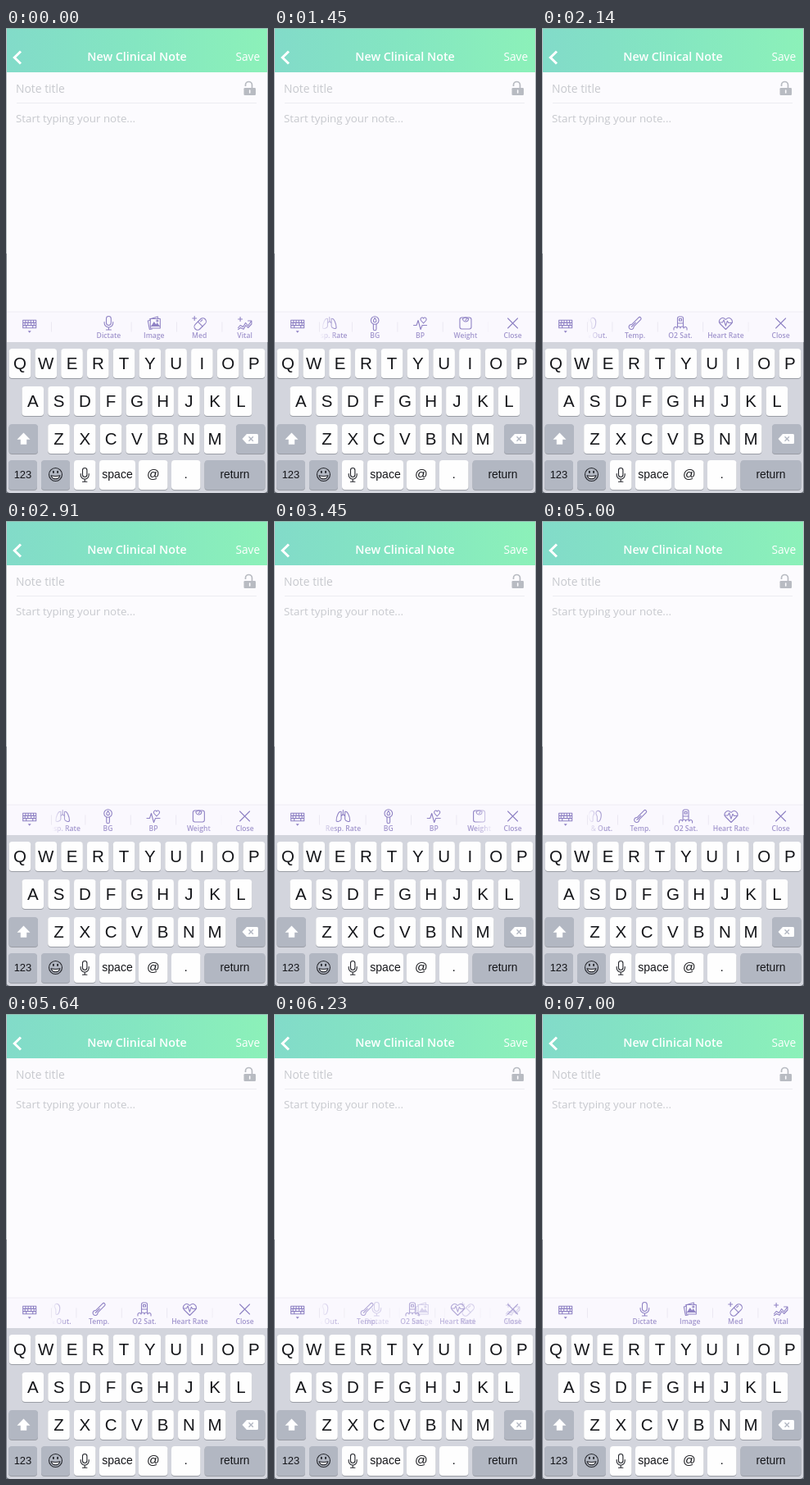
These frames come from a looping animation (320 px wide and 567 px high, 7.05 s). An HTML page:

```html
<!DOCTYPE html>
<html lang="en">
<head>
<meta charset="utf-8">
<title>Clinical note</title>
<style>
html, body { margin: 0; width: 100%; height: 100%; overflow: hidden; background: #fcfbfe; }
svg { display: block; width: 320px; height: 567px; }
text { font-family: "Open Sans", "Noto Sans", sans-serif; }
.hint { fill: #c7c9ce; }
.keys text { font-family: "Liberation Sans", Arial, sans-serif; fill: #15161a; text-anchor: middle; }
.icon { fill: none; stroke: #8f82c4; stroke-width: 1.1; stroke-linecap: round; stroke-linejoin: round; }
.icon .solid { fill: #8f82c4; stroke: none; }
.label { font-size: 8.6px; font-weight: 600; fill: #a195cd; text-anchor: middle; }
.sep { stroke: #ebe8f2; stroke-width: 1; }
#main, #vitals, #strip { animation: 7050ms linear infinite; }
#main { animation-name: main; }
#vitals { animation-name: vitals; }
#strip { animation-name: scroll; }
@keyframes main {
  0%, 12.06%, 90.8%, 100% { opacity: 1; }
  15.6%, 87.2% { opacity: 0; }
}
@keyframes vitals {
  0%, 12.06%, 90.8%, 100% { opacity: 0; }
  15.6%, 87.2% { opacity: 1; }
}
@keyframes scroll {
  0%, 19.9% { transform: translateX(0); animation-timing-function: cubic-bezier(.3, .2, .3, 1); }
  29.1%, 33.3% { transform: translateX(-247.8px); animation-timing-function: cubic-bezier(.3, .2, .3, 1); }
  44.7% { transform: translateX(0); }
  60.6% { transform: translateX(0); animation-timing-function: cubic-bezier(.5, 0, .8, .6); }
  62.1% { transform: translateX(-14.8px); animation-timing-function: cubic-bezier(.25, .4, .5, .95); }
  70.92% { transform: translateX(-241.2px); animation-timing-function: ease-out; }
  76.6%, 100% { transform: translateX(-247.8px); }
}
</style>
</head>
<body>
<svg viewBox="0 0 320 567">
  <defs>
    <linearGradient id="mint">
      <stop offset="0" stop-color="#82dbc9"/>
      <stop offset=".5" stop-color="#84e6c1"/>
      <stop offset="1" stop-color="#8cf1b9"/>
    </linearGradient>
    <linearGradient id="fade" gradientUnits="userSpaceOnUse" x1="56" x2="268" y1="0" y2="0">
      <stop offset="0" stop-color="#000"/>
      <stop offset=".1" stop-color="#fff"/>
      <stop offset=".89" stop-color="#fff"/>
      <stop offset="1" stop-color="#000"/>
    </linearGradient>
    <mask id="window" maskUnits="userSpaceOnUse" x="56" y="346" width="212" height="38">
      <rect x="56" y="346" width="212" height="38" fill="url(#fade)"/>
    </mask>
  </defs>

  <rect width="320" height="567" fill="#fcfbfe"/>
  <rect width="320" height="54" fill="url(#mint)"/>
  <path d="M18 28.5L10.3 36l7.7 7.500" fill="none" stroke="#fff" stroke-width="3"/>
  <text x="160" y="39.5" font-size="14.3" font-weight="600" fill="#fff" text-anchor="middle">New Clinical Note</text>
  <text x="280.5" y="39.5" font-size="13.7" fill="#fff">Save</text>

  <text class="hint" x="12" y="79" font-size="13.9">Note title</text>
  <text class="hint" x="12" y="115" font-size="13.35">Start typing your note...</text>
  <path d="M13 91.500H306" stroke="#ececf1"/>
  <path d="M292.500 71v-1.500a4 4 0 0 1 8 0V74" fill="none" stroke="#b8bbc2" stroke-width="1.7"/>
  <rect x="290.5" y="73" width="14.5" height="9" rx="1.2" fill="#b8bbc2"/>
  <path d="M297.7 76v3" stroke="#fcfbfe" stroke-width="1.6" stroke-linecap="round"/>

  <rect y="346" width="320" height="37" fill="#faf8fe"/>
  <path d="M0 346H320" stroke="#efecf4"/>
  <g class="icon" transform="translate(28.7 361)">
    <path d="M-8-4.8H8V4.8H-8ZM-8-1.6H8M-8 1.6H8M-4.8-4.8v3.2M-1.6-4.8v3.2M1.6-4.8v3.2M4.8-4.8v3.2M-5.5-1.6v3.2M-2-1.6v3.2M2-1.6v3.2M5.5-1.6v3.2M-4 1.6v3.2M4 1.6v3.2"/>
    <path class="solid" d="M-2 8.2h4L0 10.8Z"/>
  </g>
  <path class="sep" d="M55.5 358.5v12"/>
  <g id="main"></g>
  <g id="vitals">
    <g mask="url(#window)"><g id="strip"></g></g>
  </g>

  <g class="keys">
    <rect y="383" width="320" height="184" fill="#d3d5dd"/>
    <g id="keys"></g>
    <path d="M21.5 493.5l8 8.2h-4.3v6h-7.4v-6h-4.3Z" fill="#fff"/>
    <path d="M294 495h12.5a1.5 1.5 0 0 1 1.5 1.5v9a1.5 1.5 0 0 1-1.5 1.5H294l-5.5-6Z" fill="#fff"/>
    <path d="M296.5 498.3l5.4 5.4m0-5.4l-5.4 5.4" stroke="#b2b7c2" stroke-width="1.4"/>
    <g fill="none" stroke="#24262c" stroke-width="1.1" stroke-linecap="round">
      <circle cx="60.5" cy="544.5" r="8"/>
      <path d="M55.3 545.800q5.200 1.400 10.400 0a5.300 5 0 0 1-10.400 0Z" fill="#f4f5f7"/>
      <path d="M57.9 540.800v1.200M63.1 540.800v1.200" stroke-width="1.9"/>
      <rect x="93.500" y="536.500" width="5.400" height="11" rx="2.700"/>
      <path d="M91.200 543.500v1.500a5 5 0 0 0 10 0v-1.500M96.200 550v3.200M93.500 553.200h5.400"/>
    </g>
  </g>

  <path d="M.5 0V567M319.500 0V567" stroke="#b9bdc3"/>
  <path d="M.5 275V567M319.500 383V567" stroke="#7c818a"/>
  <path d="M0 .5H320" stroke="#93b9b0"/>
  <path d="M0 562v5h5a5 5 0 0 1-5-5ZM320 562v5h-5a5 5 0 0 0 5-5Z" fill="#6d727a"/>
</svg>
<script>
const pitch = 55.4;
const icons = {
  Dictate: `<rect x="-2.9" y="-8.5" width="5.8" height="11" rx="2.9"/><path d="M-5.3-1.5v1.2a5.3 5.3 0 0 0 10.6 0v-1.2M0 5v3M-3 8H3"/>`,
  Image: `<path d="M-5-3.5L-7.5-3-5.5 7.5-2.5 7M-5.5-5L4.5-8 5-5.5"/><path d="M-4.5-5.5H7.5V6H-4.5ZM-4.5 3.5H7.5"/><path class="solid" d="M-3.5 3.5L0-2l2.3 3.2L4-.8l2.8 4.3Z"/><circle cx="4" cy="-3" r="1"/>`,
  Med: `<g transform="translate(1 1) rotate(-45)"><rect x="-8.5" y="-4" width="17" height="8" rx="4"/><path d="M0-4V4M2.5-1.8h3"/></g><path d="M-6-8.5v5M-8.5-6h5"/>`,
  Vital: `<path d="M-8 5.5L-5.5 2.5-2 4.5 1-.5 4 3 8-2.5M4-3H8.3V1M-8 7.5L-5 5.5-1.5 7.2 1.3 2.5 4 5.5 8.3 1"/><path d="M-5.5-7.5v5M-8-5h5"/>`,
  "Resp. Rate": `<path d="M0-7.5v5L-2.5 0M0-2.5L2.5 0M-2.3-5.5C-5-7.5-8.5 1-8.3 5.5c.3 2 5.8.5 6-2ZM2.3-5.5C5-7.5 8.5 1 8.3 5.5c-.3 2-5.8.5-6-2Z"/>`,
  BG: `<circle cy="-3.5" r="4.8"/><path d="M0-6.5C-3-2.7-1.6-1.2 0-1.2S3-2.700 0-6.500ZM-1.800 1.200V7a1.800 1.800 0 0 0 3.600 0V1.200"/>`,
  BP: `<path d="M-8 2.5h3.5l2-6 3 11 2-5H8"/><path d="M4 0L.8-3.5C-.6-6 2.5-8.5 4-5.8 5.5-8.5 8.6-6 7.2-3.5Z"/>`,
  Weight: `<rect x="-7" y="-7" width="14" height="14" rx="2.5"/><path d="M-3.500-5.500a3.500 3.500 0 1 0 7 0a5 4 0 0 0-7 0Z" fill="#faf8fe"/><path d="M0-3.500L1.300-5.500"/>`,
  "Int. & Out.": `<path d="M-2-1C.5-5-3-8.500-6-5.500S-7 6-4 6.500-4 1-2-1ZM2-1C-.5-5 3-8.500 6-5.500S7 6 4 6.500 4 1 2-1Z"/>`,
  "Temp.": `<g transform="rotate(45)"><path d="M-1.800-8a1.800 1.800 0 0 1 3.600 0V4a3 3 0 1 1-3.600 0Z"/><path d="M0-1V6"/></g>`,
  "O2 Sat.": `<path d="M-3.500 4V-6a2 2 0 0 1 2-2h3a2 2 0 0 1 2 2V4M-3.500 0H3.500M-1.500-5.500h3v2.500h-3Z"/><path d="M-8 8V7a2 2 0 0 1 4-1 2 2 0 0 1 4 0 2 2 0 0 1 4 0 2 2 0 0 1 4 1V8"/>`,
  "Heart Rate": `<path d="M0 7.5L-7 .5C-10-3.5-4.5-9.5 0-4.5C4.5-9.5 10-3.5 7 .5Z"/><path d="M-8-1h4l1.700-3L0 3.200 2-2.800 3.400-.5H8"/>`,
  Close: `<path d="M-6-6L6 6M6-6L-6 6"/>`
};

const byId = id => document.getElementById(id);
const add = (id, markup) => byId(id).insertAdjacentHTML("beforeend", markup);
const sep = x => `<path class="sep" d="M${x} 358.5v12"/>`;
const item = (name, x) => `<g transform="translate(${x} 360)">
  <g class="icon">${icons[name]}</g>
  <text class="label" y="18.3">${name.replace("&", "&amp;")}</text></g>`;

["Dictate", "Image", "Med", "Vital"].forEach((name, i) => {
  const x = 125.4 + i * pitch;
  add("main", item(name, x) + (i ? sep(x - pitch / 2) : ""));
});

["Resp. Rate", "BG", "BP", "Weight", "Int. & Out.", "Temp.", "O2 Sat.", "Heart Rate"].forEach((name, i) => {
  const x = 84.4 + i * pitch;
  add("strip", item(name, x) + sep(x + pitch / 2));
});
add("vitals", item("Close", 291.6));

function key(x, y, w, label = "", size = 20.5, dark = false) {
  const drop = size > 20 ? 7.3 : 4;
  add("keys", `<rect x="${x}" y="${y + 1}" width="${w}" height="36" rx="4" fill="#9a9da5"/>
    <rect x="${x}" y="${y}" width="${w}" height="36" rx="4" fill="${dark ? "#b2b7c2" : "#fefefe"}"/>
    <text x="${x + w / 2}" y="${y + 18 + drop}" font-size="${size}">${label}</text>`);
}

[["QWERTYUIOP", 17, 391], ["ASDFGHJKL", 32.8, 437], ["ZXCVBNM", 64.5, 483]].forEach(([row, x, y]) =>
  [...row].forEach((c, i) => key(x + i * 31.77 - 13.3, y, 26.6, c)));
key(3.5, 483, 35.5, "", 14, true);
key(281, 483, 35.5, "", 14, true);
key(3, 527, 35, "123", 13, true);
key(43, 527, 35, "", 14, true);
key(83, 527, 26.5);
key(114, 527, 44, "space", 14);
key(162, 527, 35.5, "@", 15.5);
key(202, 527, 35.5, ".", 15.5);
key(242.5, 527, 74, "return", 13.8, true);
</script>
</body>
</html>
```
